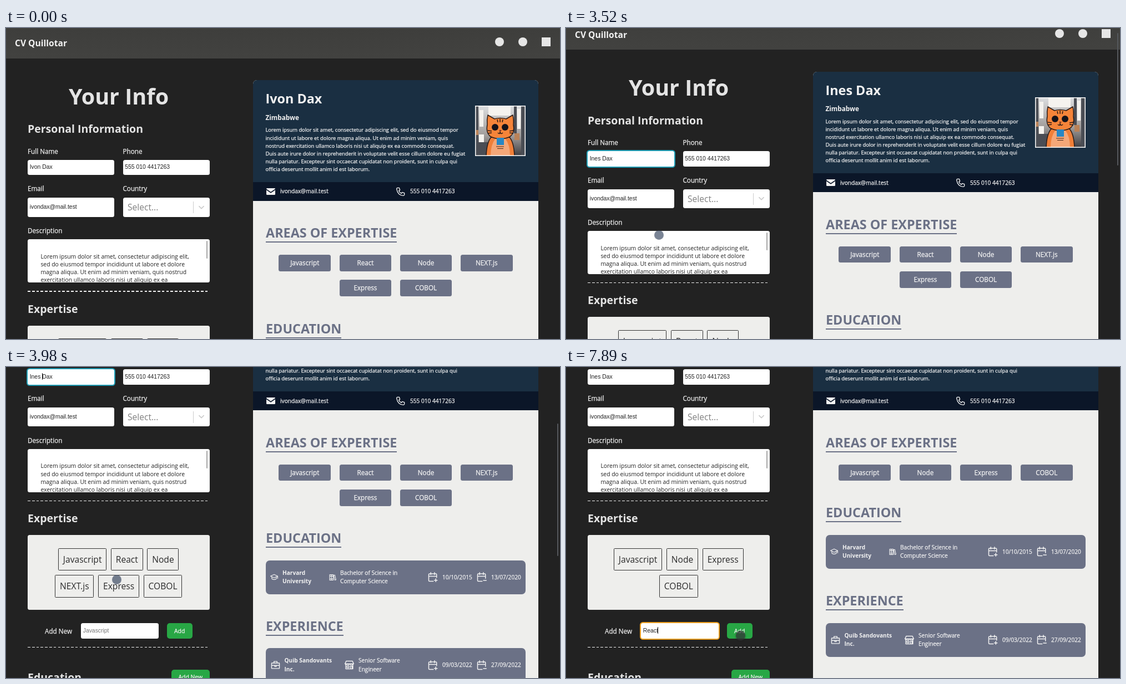
Animation, 998 px wide and 561 px high, one loop 8 s. Source, as an HTML page:

```html
<!DOCTYPE html>
<html lang="en">
<head>
<meta charset="utf-8">
<title>CV Quillotar</title>
<style>
html, body { margin: 0; width: 100%; height: 100%; overflow: hidden; background: #222; }
#stage { position: relative; width: 998px; height: 561px; overflow: hidden; background: #222; font-family: "Open Sans", sans-serif; }
#stage div, #stage svg { position: absolute; box-sizing: border-box; }
#page { left: 0; top: 0; width: 998px; height: 900px; }
.t { white-space: pre; }
.lit, #pills { -webkit-text-stroke: .25px; }
.arial { font-family: "Liberation Sans", Arial, sans-serif; }
.dash { height: 1.6px; background: repeating-linear-gradient(90deg, #f2f2f2 0 4.7px, transparent 4.7px 7.8px); }
.caret { display: inline-block; width: 1px; height: 12px; margin: 0 -.5px; background: #111; vertical-align: -2px; }
#stage .wrap { display: flex; flex-wrap: wrap; justify-content: center; align-content: flex-start; }
#stage .wrap div { position: static; white-space: pre; text-align: center; }
#tags { gap: 7.8px; }
#tags div { height: 40.6px; padding: 0 7.8px; border: 1px solid #333; border-radius: 1.5px; font-size: 15.6px; line-height: 39px; color: #2a2a2a; }
#pills { gap: 15.6px; }
#pills div { width: 93.6px; height: 29.8px; border-radius: 3.5px; background: #6b7186; color: #f4f4f4; font-size: 11.7px; line-height: 29.8px; }
#cursor { width: 17px; height: 17px; margin: -8.5px; border-radius: 50%; }
#cursor.idle { background: rgba(48, 50, 52, .74); box-shadow: 0 0 2px rgba(90, 90, 90, .8), 0 1px 3px rgba(0, 0, 0, .35); }
#cursor.move { background: rgba(10, 28, 60, .54); box-shadow: inset 0 0 0 1.2px rgba(140, 145, 160, .25); }
</style>
</head>
<body>
<div id="stage">
  <div id="page"></div>
  <div id="bar"></div>
  <div id="cursor"></div>
</div>
<script>
const $ = id => document.getElementById(id);
const page = $('page');

const LIGHT = '#e4e4e4', WHITE = '#f2f2f2', SLATE = '#6b7186', PAPER = '#eeeeec', GREEN = '#28a745';

function box(x, y, w, h, css = '', parent = page) {
  const el = document.createElement('div');
  el.style.cssText = `left:${x}px;top:${y}px;width:${w}px;height:${h}px;${css}`;
  parent.append(el);
  return el;
}

// y is the middle of the first line
function text(x, y, str, size, color = LIGHT, weight = 400, parent = page, lh = 20) {
  const el = document.createElement('div');
  el.className = color === WHITE && weight === 400 ? 't lit' : 't';
  el.textContent = str;
  el.style.cssText = `left:${x}px;top:${y - lh / 2}px;font-size:${size}px;line-height:${lh}px;color:${color};font-weight:${weight}`;
  parent.append(el);
  return el;
}

function icon(cx, cy, size, body, parent = page, color = WHITE) {
  parent.insertAdjacentHTML('beforeend',
    `<svg viewBox="0 0 24 24" width="${size}" height="${size}" style="left:${cx - size / 2}px;top:${cy - size / 2}px"
      fill="none" stroke="${color}" stroke-width="2" stroke-linejoin="round" stroke-linecap="round">${body}</svg>`);
}

const ICONS = {
  mail: '<path fill="#f2f2f2" stroke="none" d="M2 3h20q2 0 2 2L12 13 0 5q0-2 2-2zM0 8l12 8 12-8v11q0 2-2 2H2q-2 0-2-2z"/>',
  phone: '<path d="M3 2h5l2 6-3 2q2 5 7 7l2-3 6 2v5q-1 2-3 2Q4 22 1 5q0-2 2-3z"/>',
  cap: '<path d="M1 9 12 4l11 5-11 5zM5 11v6q7 5 14 0v-6M23 9v7"/>',
  books: '<path d="M2 3h6v18H2zM8 3h6v18H8zM15 5l4-1 4 16-4 1zM2 8h12M2 16h12"/>',
  add: '<path d="M13 22H4q-2 0-2-2V6q0-2 2-2h15q2 0 2 2v7M2 10h19M7 1v5M16 1v5M19 16v7M15.500 19.500h7"/>',
  minus: '<path d="M13 22H4q-2 0-2-2V6q0-2 2-2h15q2 0 2 2v9M2 10h19M7 1v5M16 1v5M16 20h7"/>',
  bag: '<path d="M3 7h18q1 0 1 1v12q0 1-1 1H3q-1 0-1-1V8q0-1 1-1zM8 7V3h8v4M2 13h20M10 13v3h4v-3"/>',
  shop: '<path d="M3 11v11h18V11M4 2h16l3 7q-3 4-6 0-3 4-5 0-3 4-5 0-3 4-6 0zM1 9h22M6 14h5v5H6zM15 22v-8h4v8"/>',
  down: '<path stroke-width="3" d="M5 8l7 7 7-7"/>'
};

function button(x, y, w, label, tx) {
  box(x, y, w, 27.5, `background:${GREEN};border-radius:5px`);
  text(tx, y + 13.8, label, 10.4, WHITE);
}

function field(x, y, w, h, str, color = '#222') {
  const el = box(x, y, w, h, 'background:#fff;border-radius:3.5px');
  const label = text(3.7, h / 2, str, 10.4, color, 400, el);
  label.classList.add('arial');
  return { el, label };
}

// Header
box(0, 0, 998, 54.5, 'background:linear-gradient(#3e3e3c,#424240)');
text(16, 27, 'CV Quillotar', 15.6, WHITE, 700);
box(881, 17, 16, 16, 'background:#e6e6e6;border-radius:50%');
box(923, 17, 16, 16, 'background:#e6e6e6;border-radius:50%');
box(965, 17, 16, 16, 'background:#e6e6e6');

// Form
text(113, 122.5, 'Your Info', 39.5, LIGHT, 700, page, 50);
text(39, 182, 'Personal Information', 19.5, LIGHT, 700);
[[39, 221.5, 'Full Name'], [210.5, 221.5, 'Phone'], [39, 289, 'Email'],
 [210.5, 289, 'Country'], [39, 365, 'Description'], [70, 709, 'Add New']]
  .forEach(([x, y, s]) => text(x, y, s, 11.7, WHITE));

const nameField = field(39, 237.5, 156, 27.5, '');
field(210.5, 237.5, 156, 27.5, '555 010 4417263');
field(39, 306, 156, 34.5, 'ivondax@mail.test');

const select = box(210.5, 306, 156, 34.5, 'background:#fff;border-radius:3.5px');
text(8.5, 17.2, 'Select...', 15.6, '#808080', 400, select);
box(126, 7, 1, 21, 'background:#ccc', select);
icon(141, 17.5, 14, ICONS.down, select, '#ccc');

const LOREM = ['Lorem ipsum dolor sit amet, consectetur adipiscing elit,', 'sed do eiusmod tempor incididunt ut labore et dolore',
  'magna aliqua. Ut enim ad minim veniam, quis nostrud', 'exercitation ullamco laboris nisi ut aliquip ex ea'];
const area = box(39, 381, 327.5, 78, 'background:#fff;border-radius:3.5px;overflow:hidden');
text(23.4, 31, LOREM.join('\n'), 10.4, '#222', 400, area, 14.03);
box(322, 3, 2.3, 32, 'background:#a9a9a9;border-radius:1px', area);

[474.3, 738.3].forEach(y => { box(39, y, 327.5, 1.6).className = 'dash'; });
text(39, 506.5, 'Expertise', 19.5, LIGHT, 700);
box(39, 536.8, 327.5, 135, `background:${PAPER};border-radius:3.5px`);
const tags = box(62.5, 560.1, 280.5, 90);
tags.id = 'tags';
tags.className = 'wrap';
const newField = field(135, 695.5, 139.5, 27.5, '');
button(290, 695.5, 45.5, 'Add', 303);
text(39, 793, 'Education', 19.5, LIGHT, 700);
button(298, 779, 68.5, 'Add New', 310.5);

// Preview
box(444.5, 94, 514.5, 806, `background:${PAPER};border-radius:7px 7px 0 0`);
box(444.5, 94, 514.5, 183.5, 'background:#1a2f42;border-radius:7px 7px 0 0');
box(444.5, 277.5, 514.5, 34.3, 'background:#0b1628');
const title = text(467.5, 127, '', 23.39, WHITE, 700, page, 30);
text(467.5, 160.5, 'Zimbabwe', 11.7, WHITE, 700);
text(467.5, 184.5, ['Lorem ipsum dolor sit amet, consectetur adipiscing elit, sed do eiusmod tempor',
  'incididunt ut labore et dolore magna aliqua. Ut enim ad minim veniam, quis',
  'nostrud exercitation ullamco laboris nisi ut aliquip ex ea commodo consequat.',
  'Duis aute irure dolor in reprehenderit in voluptate velit esse cillum dolore eu fugiat',
  'nulla pariatur. Excepteur sint occaecat cupidatat non proident, sunt in culpa qui',
  'officia deserunt mollit anim id est laborum.'].join('\n'), 9.36, WHITE, 400, page, 14.03);
icon(477, 294.5, 16, ICONS.mail);
text(494, 294, 'ivondax@mail.test', 10.14, WHITE);
icon(711, 294.5, 16, ICONS.phone);
text(728, 294, '555 010 4417263', 10.14, WHITE);

page.insertAdjacentHTML('beforeend', `
<svg viewBox="0 0 91 91" width="91" height="91" style="left:845px;top:140px">
  <defs><linearGradient id="city" x2="0" y2="1"><stop offset="0" stop-color="#dcdee0"/><stop offset=".6" stop-color="#a09c9a"/><stop offset="1" stop-color="#3c3d42"/></linearGradient></defs>
  <rect width="91" height="91" fill="url(#city)"/>
  <path fill="#4a4d54" d="M0 0h6v91H0zM70 0h5v50h-5zM83 0h8v91h-8zM0 66h24v25H0z"/>
  <path fill="#f5f3ef" d="M24 0h40v18H24zM8 8h7v30H8zM76 6h6v36h-6zM7 52h9v14H7z"/>
  <path fill="#b98258" d="M71 50h9v12h-9zM1 44h5v9H1z"/>
  <g stroke="#2a1b17" stroke-width="1.5" stroke-linejoin="round">
    <path fill="#f07f38" d="M20 91Q21 66 29 57H62Q70 66 71 91z"/>
    <path fill="#f4a778" stroke="none" d="M28 91Q28 70 37 59H54Q63 70 63 91z"/>
    <path fill="#f58439" d="M23 17L35 24Q45 21 56 24L68 17Q70 27 69 34Q72 49 63 56Q46 64 28 56Q19 49 22 34Q21 26 23 17z"/>
    <path fill="none" d="M45 24v6M40 25l1 5M50 25l-1 5M23 45l7 1M23 50l7-1M69 45l-7 1M69 50l-7-1M41 49q4 4 4-2q1 6 5 2"/>
  </g>
  <circle cx="36" cy="39" r="6" fill="#15131a"/><circle cx="54" cy="39" r="6" fill="#15131a"/>
  <path fill="#7a3424" d="M43 44h5l-2.500 3z"/>
  <rect x="39" y="58" width="13" height="13" fill="#2787c4"/>
  <path stroke="#4a2a1e" d="M38 74h14M40 77.500h11"/>
  <rect x=".8" y=".8" width="89.4" height="89.4" fill="none" stroke="#f4f4f4" stroke-width="1.6"/>
</svg>`);

function heading(y, str, parent) {
  const el = text(468, y, str, 23.39, SLATE, 700, parent, 30);
  el.style.height = '33px';
  el.style.borderBottom = `2px solid ${SLATE}`;
}

function card(y, icons, lines, dates, parent) {
  const mid = y + 30.5, c = box(468, y, 468, 61.5, `background:${SLATE};border-radius:7px`, parent);
  icons.forEach(([x, size, key]) => icon(x - 468, 30.5, size, ICONS[key], c));
  lines.forEach(([x, str, weight]) => text(x, mid - 7.8, str, 10.14, WHITE, weight, parent, 15.2));
  icon(301, 30.5, 18, ICONS.add, c);
  icon(389, 30.5, 18, ICONS.minus, c);
  dates.forEach((d, i) => text(786 + i * 88, mid - .5, d, 10.14, WHITE, 400, parent));
}

heading(369, 'AREAS OF EXPERTISE', page);
const pills = box(468, 409, 468, 80);
pills.id = 'pills';
pills.className = 'wrap';
const lower = box(0, 0, 998, 900);
heading(541.5, 'EDUCATION', lower);
card(582, [[483, 14, 'cap'], [588, 13, 'books']],
  [[498, 'Harvard\nUniversity', 700], [602, 'Bachelor of Science in\nComputer Science', 400]],
  ['10/10/2015', '13/07/2020'], lower);
heading(700.5, 'EXPERIENCE', lower);
card(740.7, [[485, 17, 'bag'], [618, 17, 'shop']],
  [[501.5, 'Quib Sandovants\nInc.', 700], [635, 'Senior Software\nEngineer', 400]],
  ['09/03/2022', '27/09/2022'], lower);

$('bar').style.cssText = 'left:992.5px;width:2.5px;height:239px;background:#55585c;border-radius:1px';

// Timeline: [time, value...]; "|" marks the caret
const LOOP = 8000, STEP = 66.3;
const NAME = [[0, 'Ivon |Dax'], [870, 'Ivon |Dax'], [1200, 'Ivon|Dax'], [1790, 'Iv|Dax'], [1860, '|Dax'], [2120, 'I|Dax'],
  [2320, 'In|Dax'], [2450, 'Ine|Dax'], [2590, 'Ines|Dax'], [2720, 'Ines |Dax']];
const SKILL = [[0, '|'], [6630, '|'], [6900, 'R|'], [7100, 'Re|'], [7290, 'Rea|'], [7490, 'Reac|'], [7690, 'React|']];
const ALL = ['Javascript', 'React', 'Node', 'NEXT.js', 'Express', 'COBOL'];
const REMOVED = [[0, []], [4780, ['React']], [5900, ['React', 'NEXT.js']]];
const SCROLL = [[3460, 0], [3522, 15.5], [3588, 44], [3721, 111.3], [3850, 198], [3920, 224], [3980, 233.5]];
const PATH = [[70, 745, 505], [300, 520, 380], [560, 200, 250], [700, 132, 226], [870, 139, 265],
  [3120, 139, 265], [3250, 150, 310], [3380, 167, 373], [3522, 167, 373], [3721, 188, 377], [3980, 199, 383],
  [4310, 199, 383], [4620, 217, 352], [4900, 218, 353], [5180, 241, 375], [5570, 293, 356], [5900, 293, 356],
  [6200, 255, 430], [6430, 225, 474], [6600, 222, 476], [6900, 289, 483], [7100, 289, 483], [7290, 291, 483],
  [7450, 291, 483], [7690, 331, 484], [7890, 314, 484]];

const last = (rows, t) => rows.filter(r => r[0] <= t).pop() || rows[0];

function mix(rows, t) {
  const i = rows.findIndex(r => r[0] > t);
  if (i === 0) return rows[0].slice(1);
  if (i < 0) return rows[rows.length - 1].slice(1);
  const a = rows[i - 1], b = rows[i], k = (t - a[0]) / (b[0] - a[0]);
  return a.slice(1).map((v, n) => v + (b[n + 1] - v) * k);
}

function typed({ el, label }, [since, str], t, focused, ring, hint = '') {
  const [before, after] = str.split('|');
  el.style.boxShadow = focused ? `0 0 0 2px ${ring}` : 'none';
  label.style.color = before + after ? '#222' : '#777';
  label.textContent = before;
  if (focused && (t - since) % 1000 < 500) {
    const caret = document.createElement('span');
    caret.className = 'caret';
    label.append(caret);
  }
  label.append(before + after ? after : hint);
}

let shown = '';
function setSkills(gone) {
  const list = ALL.filter(s => !gone.includes(s));
  if (shown === list.join()) return;
  shown = list.join();
  for (const parent of [tags, pills]) {
    parent.replaceChildren(...list.map(s => {
      const el = document.createElement('div');
      el.textContent = s;
      return el;
    }));
  }
  lower.style.top = list.length > 4 ? '0' : '-45.6px';
}

function draw(now) {
  const t = Math.floor((now % LOOP + 8) / STEP) * STEP + 8;
  const name = last(NAME, t);
  title.textContent = name[1].replace('|', '');
  typed(nameField, name, t, t >= 870 && t < 4780, '#1d9db5');
  typed(newField, last(SKILL, t), t, t >= 6630, '#f0a020', 'Javascript');
  setSkills(last(REMOVED, t)[1]);

  const [y] = mix(SCROLL, t);
  page.style.top = -y + 'px';
  $('bar').style.top = 2.5 + y * .426 + 'px';
  $('bar').style.display = t >= 3520 && t < 4310 ? 'block' : 'none';

  const [cx, cy] = mix(PATH, t), cursor = $('cursor');
  cursor.style.left = cx + 'px';
  cursor.style.top = cy + 'px';
  cursor.style.display = t >= 70 ? 'block' : 'none';
  cursor.className = t >= 3180 && t < 4780 ? 'move' : 'idle';
}

const start = performance.now();
function tick() {
  draw(performance.now() - start);
  requestAnimationFrame(tick);
}
tick();
</script>
</body>
</html>
```
